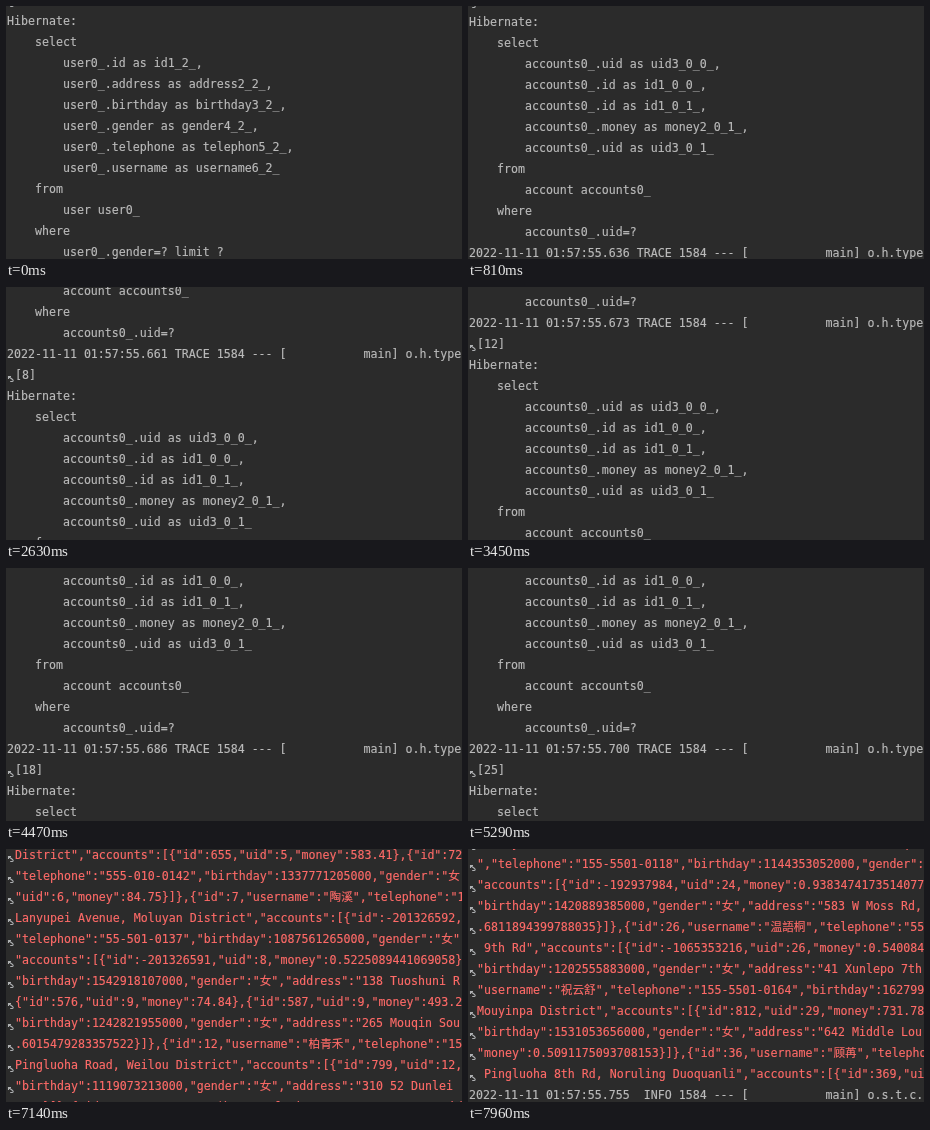
Recreate the animation shown at these times as an HTML page. Size 456 px wide and 253 px high, loop 7990 ms.

```html
<!DOCTYPE html>
<html lang="en">
<head>
<meta charset="utf-8">
<title>Console log</title>
<style>
  html, body { margin: 0; width: 100%; height: 100%; overflow: hidden; background: #2b2b2b; }
  #stage { position: relative; width: 456px; height: 253px; overflow: hidden; background: #2b2b2b; }
  #log {
    position: absolute; left: 0; top: 0; width: 456px;
    font: 11.628px/20px "DejaVu Sans Mono", "Noto Sans CJK SC", "Noto Sans CJK", monospace;
    font-variant-ligatures: none; color: #bbb; -webkit-text-stroke: 0.15px; will-change: transform;
  }
  .row { position: relative; height: 21px; padding-left: 1px; white-space: pre; overflow: hidden; }
  .wrapped { padding-left: 9px; }
  .err { color: #ff6b68; }
  .row svg { position: absolute; left: 0; top: 0; width: 9px; height: 21px; }
  #defs { position: absolute; width: 0; height: 0; }
</style>
</head>
<body>
<svg id="defs"><symbol id="hook" viewBox="0 0 9 21">
  <path d="M2.5 14V11.5H5M2.5 11.5L6.2 14.2Q8.2 16 6.2 16.5H4.2" fill="none" stroke="#afb1b3" stroke-width="1.1"/>
</symbol></svg>
<div id="stage"><div id="log"></div></div>
<script>
const LOOP = 7990;
const rows = [];
const add = (text, cls = "") => rows.push({ text, cls });
const wrap = text => add(text, "wrapped");
const json = text => add(text, "wrapped err");

// Piecewise linear interpolation through [x, y] points
function lerp(points, x) {
  let k = 0;
  while (k < points.length - 2 && x > points[k + 1][0]) k++;
  const [x0, y0] = points[k], [x1, y1] = points[k + 1];
  return Math.round(y0 + (y1 - y0) * (x - x0) / (x1 - x0));
}

let seed = 17;
const rand = n => (seed = (seed * 16807) % 2147483647) % n;
const digits = n => Array.from({ length: n }, () => rand(10)).join("");

const stamp = (ms, level) =>
  `2022-11-11 01:57:55.${ms} ${level} 1584 --- [           main] `;

function trace(ms, value) {
  add(stamp(ms, "TRACE") + "o.h.type.descriptor.sql.BasicBinder");
  wrap(`[${value}]`);
}

function query(columns, table, condition) {
  const deep = s => add(" ".repeat(8) + s);
  add("Hibernate:");
  add("    select");
  columns.forEach((c, i) => deep(c + (i < columns.length - 1 ? "," : "")));
  add("    from");
  deep(table);
  add("    where");
  deep(condition);
}

const filler = [
  () => `"birthday":1${digits(12)},"gender":"女","address":"${100 + rand(800)} Lomupan Road, Tu`,
  () => `"money":0.${digits(16)}}]},{"id":${10 + rand(14)},"username":"陶禾","telepho`,
  () => `Weilou District","accounts":[{"id":${100 + rand(800)},"uid":${10 + rand(14)},"money":${digits(3)}.${digits(2)}`,
  () => `.${digits(16)}}]},{"id":${10 + rand(14)},"username":"柏云桐","telephone":"55`
];
const fill = (n, from) => {
  for (let i = 0; i < n; i++) json(filler[(i + from) % 4]());
};

// Queries
wrap("[1]");
query([
  "user0_.id as id1_2_", "user0_.address as address2_2_",
  "user0_.birthday as birthday3_2_", "user0_.gender as gender4_2_",
  "user0_.telephone as telephon5_2_", "user0_.username as username6_2_"
], "user user0_", "user0_.gender=? limit ?");
trace(621, "女");

const ids = [1, 2, 3, 4, 5, 6, 7, 8, 9, 11, 12, 14, 15, 17, 18, 21, 24, 25, 26, 27, 29, 33, 36];
const traceMs = [[0, 632], [3, 644], [10, 673], [14, 686], [19, 710], [22, 722]];
ids.forEach((id, i) => {
  query([
    "accounts0_.uid as uid3_0_0_", "accounts0_.id as id1_0_0_",
    "accounts0_.id as id1_0_1_", "accounts0_.money as money2_0_1_",
    "accounts0_.uid as uid3_0_1_"
  ], "account accounts0_", "accounts0_.uid=?");
  trace(lerp(traceMs, i), id);
});

// Serialized result
add('[{"id":1,"username":"温青","telephone":"555-010-0123","birthday":13', "err");
fill(10, 2);
[
  'District","accounts":[{"id":655,"uid":5,"money":583.41},{"id":72',
  '"telephone":"555-010-0142","birthday":1337771205000,"gender":"女',
  '"uid":6,"money":84.75}]},{"id":7,"username":"陶溪","telephone":"1',
  'Lanyupei Avenue, Moluyan District","accounts":[{"id":-201326592,',
  '"telephone":"55-501-0137","birthday":1087561265000,"gender":"女"',
  '"accounts":[{"id":-201326591,"uid":8,"money":0.5225089441069058}',
  '"birthday":1542918107000,"gender":"女","address":"138 Tuoshuni R',
  '{"id":576,"uid":9,"money":74.84},{"id":587,"uid":9,"money":493.2',
  '"birthday":1242821955000,"gender":"女","address":"265 Mouqin Sou',
  '.6015479283357522}]},{"id":12,"username":"柏青禾","telephone":"15',
  'Pingluoha Road, Weilou District","accounts":[{"id":799,"uid":12,',
  '"birthday":1119073213000,"gender":"女","address":"310 52 Dunlei ',
  '5.27}]},{"id":14,"username":"柏云","telephone":"555-010-0171","bi'
].forEach(json);
fill(10, 0);
[
  '","telephone":"155-5501-0118","birthday":1144353052000,"gender":',
  '"accounts":[{"id":-192937984,"uid":24,"money":0.9383474173514077',
  '"birthday":1420889385000,"gender":"女","address":"583 W Moss Rd,',
  '.6811894399788035}]},{"id":26,"username":"温語桐","telephone":"55',
  ' 9th Rd","accounts":[{"id":-1065353216,"uid":26,"money":0.540084',
  '"birthday":1202555883000,"gender":"女","address":"41 Xunlepo 7th',
  '"username":"祝云舒","telephone":"155-5501-0164","birthday":162799',
  'Mouyinpa District","accounts":[{"id":812,"uid":29,"money":731.78',
  '"birthday":1531053656000,"gender":"女","address":"642 Middle Lou',
  '"money":0.5091175093708153}]},{"id":36,"username":"顾苒","telepho',
  ' Pingluoha 8th Rd, Noruling Duoquanli","accounts":[{"id":369,"ui'
].forEach(json);
add(stamp(755, " INFO") + "o.s.t.c.");

const log = document.getElementById("log");
log.innerHTML = rows.map(({ text, cls }) => {
  const icon = cls.includes("wrapped") ? '<svg><use href="#hook"/></svg>' : "";
  return `<div class="row ${cls}">${icon}${text}</div>`;
}).join("");

// Scrolling: a new position at each time, spaced evenly between the stops
const times = [
  0, 390, 610, 810, 1010, 1210, 1410, 1610, 1830, 2030, 2230, 2430, 2630,
  2830, 3030, 3250, 3450, 3650, 3850, 4070, 4270, 4470, 4690, 4890, 5090,
  5290, 5490, 5690, 5910, 6140, 6340, 6540, 6740, 6940, 7140, 7340, 7730, 7930, 7960
];
const stops = [[0, 16], [7, 1337], [16, 3250], [21, 4197], [28, 5630], [34, 6829], [36, 7229], [38, 7303]];

const start = performance.now();
function draw() {
  const t = (performance.now() - start) % LOOP;
  let step = times.length - 1;
  while (times[step] > t) step--;
  log.style.transform = `translateY(${-lerp(stops, step)}px)`;
  requestAnimationFrame(draw);
}
draw();
</script>
</body>
</html>
```
